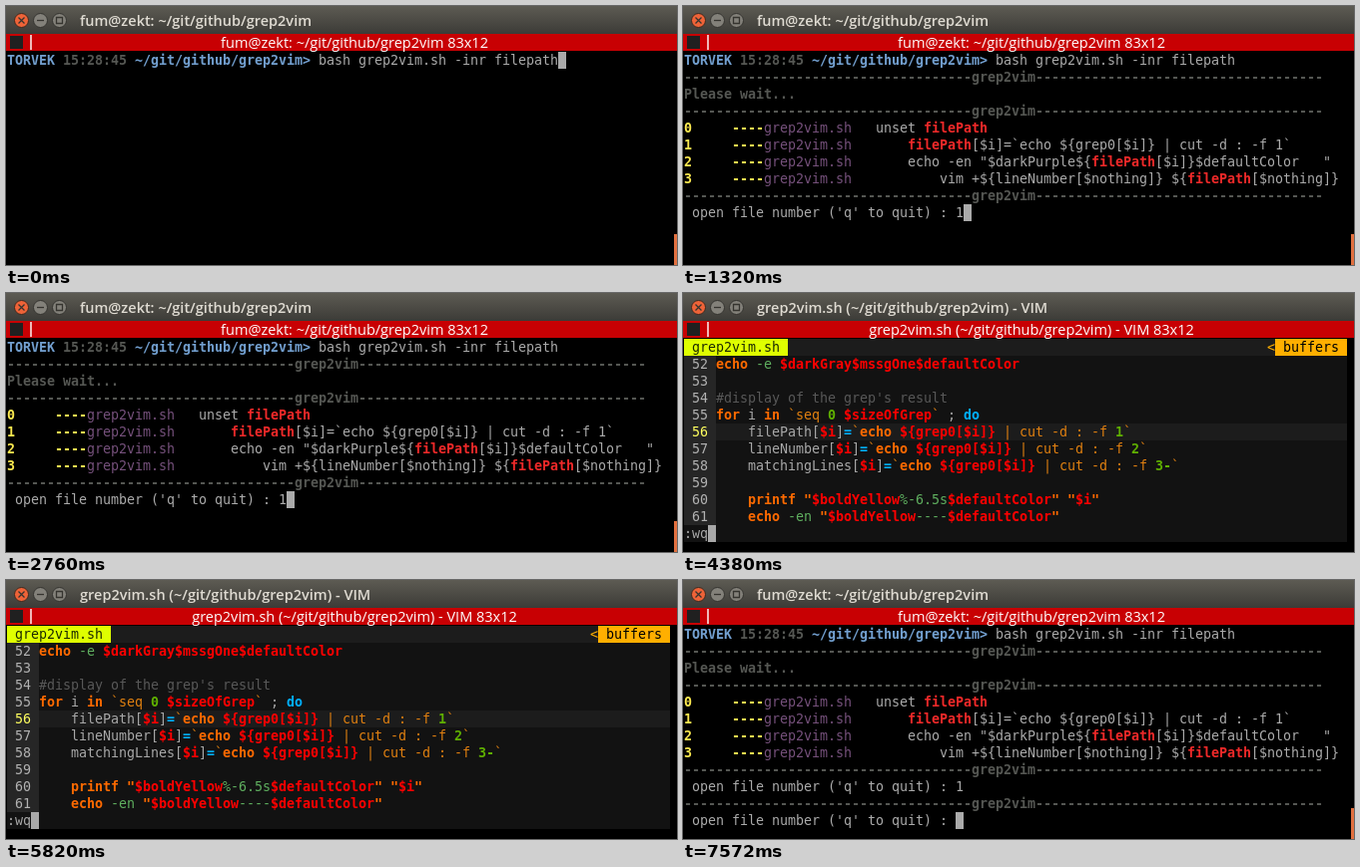
An HTML page with a canvas for the animation above (8.1 s loop, 672 px wide and 260 px high).

```html
<!DOCTYPE html>
<html lang="en">
<head>
<meta charset="utf-8">
<title>Terminal session</title>
<style>
  html, body { margin: 0; width: 100%; height: 100%; overflow: hidden; background: #000; }
  canvas { display: block; }
</style>
</head>
<body>
<canvas id="stage" width="672" height="260"></canvas>
<script>
const ctx = document.getElementById("stage").getContext("2d");
const CELL = 8, ROW = 17, LEFT = 1, TOP = 46, COLS = 83, LOOP = 8100;
const MONO = '13.333px "DejaVu Sans Mono", monospace';
const SANS = '14.5px "Open Sans", "Noto Sans", sans-serif';

// Markup: "^" plus a letter starts a run in that colour; capitals are bold.
const SHELL = { w: "#aaaaaa", b: "#729fcf", k: "#555753", y: "#fce94f", p: "#75507b", r: "#ef2929" };
const VIM = { w: "#a8a8a8", o: "#ff6a00", s: "#e08010", r: "#ff0000", g: "#5faf00",
              e: "#5faf5f", b: "#00afff", k: "#585858", n: "#b2b2b2", y: "#ffff5f",
              d: "#1c2a00", a: "#ffaf00", x: "#000000" };

const USER = "fum@zekt";
const DIR = "~/git/github/grep2vim";
const RULE = "^K" + "-".repeat(36) + "grep2vim" + "-".repeat(36);
const ASK = "^w open file number ('q' to quit) : ";
const COMMAND = `^BTORVEK ^K15:28:45 ^B${DIR}> ^wbash grep2vim.sh -inr filepath`;
const match = (number, code) => `^Y${number}     ----^pgrep2vim.sh   ^w${code}`;
const RESULTS = [
  COMMAND, RULE, "^KPlease wait...", RULE,
  match(0, "unset ^RfilePath"),
  match(1, "    ^RfilePath^w[$i]=`echo ${grep0[$i]} | cut -d : -f 1`"),
  match(2, '    echo -en "$darkPurple${^RfilePath^w[$i]}$defaultColor   "'),
  match(3, "        vim +${lineNumber[$nothing]} ${^RfilePath^w[$nothing]}"),
  RULE
];

const assign = (name, field) =>
  `^w    ${name}[^R$i^w]^B=^s\`^Oecho ^R\${grep0[$i]}^s | cut -d : -f ^G${field}^s\``;
const SOURCE = [
  "^Oecho ^e-e ^R$darkGray$mssgOne$defaultColor",
  "",
  "^k#display of the grep's result",
  "^Ofor ^wi ^Oin ^s`seq ^G0 ^R$sizeOfGrep^s` ^w; ^Bdo",
  assign("filePath", 1),
  assign("lineNumber", 2),
  assign("matchingLines", "3-"),
  "",
  '^O    printf "^R$boldYellow^e%-6.5s^R$defaultColor^O" "^R$i^O"',
  '^O    echo ^e-en ^O"^R$boldYellow^e----^R$defaultColor^O"'
];

function rect(color, x, y, w, h) {
  ctx.fillStyle = color;
  ctx.fillRect(x, y, w, h);
}

function cells(color, col, row, count) {
  rect(color, LEFT + col * CELL, TOP + row * ROW, count * CELL, ROW);
}

function line(markup, row, palette, col = 0) {
  for (const run of markup.split("^").slice(1)) {
    const style = run[0], key = style.toLowerCase();
    ctx.font = (style === key ? "" : "bold ") + MONO;
    ctx.fillStyle = palette[key];
    for (const char of run.slice(1)) {
      ctx.fillText(char, LEFT + col++ * CELL, TOP + row * ROW + 13);
    }
  }
}

function button(x, color, edge, glyph) {
  ctx.beginPath();
  ctx.arc(x, 14.5, 7, 0, Math.PI * 2);
  ctx.fillStyle = color;
  ctx.fill();
  ctx.strokeStyle = edge;
  ctx.lineWidth = 1;
  ctx.stroke();
  ctx.strokeStyle = "#35342f";
  ctx.lineWidth = 1.3;
  ctx.stroke(new Path2D(glyph));
}

function windowFrame(title) {
  const shade = ctx.createLinearGradient(0, 0, 0, 28);
  shade.addColorStop(0, "#5d5b53");
  shade.addColorStop(1, "#3c3b37");
  rect(shade, 0, 0, 672, 28);
  button(15.5, "#ee6338", "#3c2a20", "M12.5 11.5l6 6m0-6l-6 6");
  button(34.5, "#83817a", "#34332f", "M31 14.5h7");
  button(53.5, "#83817a", "#34332f", "M50.5 11.5h6v6h-6z");
  ctx.font = "600 " + SANS;
  ctx.fillStyle = "#dfdbd2";
  ctx.fillText(title, 74, 20);

  rect("#c80003", 0, 28, 672, 17);
  rect("#202020", 4, 30, 13, 13);
  rect("#f0b8b8", 24, 29, 2, 15);
  ctx.font = SANS;
  ctx.fillStyle = "#ffffff";
  ctx.textAlign = "center";
  ctx.fillText(title + " 83x12", 349, 42);
  ctx.textAlign = "left";
}

function shell(lines, cursorCol) {
  windowFrame(`${USER}: ${DIR}`);
  lines.forEach((text, row) => line(text, row, SHELL));
  cells("#aaaaaa", cursorCol, lines.length - 1, 1);
  rect("#e2703f", 669, 229, 3, 31);
}

function editor(quitting) {
  windowFrame(`grep2vim.sh (${DIR}) - VIM`);
  cells("#1c1c1c", 0, 0, COLS);
  cells("#dfff00", 0, 0, 13);
  cells("#ffaf00", 74, 0, 9);
  line("^d grep2vim.sh", 0, VIM);
  line("^a<^x buffers", 0, VIM, 73);

  SOURCE.forEach((text, i) => {
    const row = i + 1, current = i === 4;
    cells(current ? "#1c1c1c" : "#121212", 0, row, COLS);
    cells("#262626", 0, row, 4);
    line(`^${current ? "y" : "n"} ${52 + i}`, row, VIM);
    line(text, row, VIM, 4);
  });

  cells("#121212", 0, 11, COLS);
  if (quitting) {
    line("^w:wq", 11, VIM);
    cells("#a8a8a8", 3, 11, 1);
  } else {
    cells("#a8a8a8", 8, 5, 1);
    line("^xf", 5, VIM, 8);
    line('^w"grep2vim.sh" 77L, 2496C', 11, VIM);
    line("^w56,5", 11, VIM, 65);
    line("^w76%", 11, VIM, 79);
  }
}

// Each scene holds until its end time in ms.
const SCENES = [
  [660, () => shell([COMMAND], 69)],
  [1320, () => shell([...RESULTS, ASK], 34)],
  [3720, () => shell([...RESULTS, ASK + "1"], 35)],
  [4380, () => editor(false)],
  [6780, () => editor(true)],
  [LOOP, () => shell([...RESULTS, ASK + "1", RULE, ASK], 34)]
];

function draw(now) {
  const time = now % LOOP;
  rect("#000000", 0, 0, 672, 260);
  SCENES.find(([end]) => time < end)[1]();
  requestAnimationFrame(() => draw(performance.now()));
}
draw(performance.now());
</script>
</body>
</html>
```
